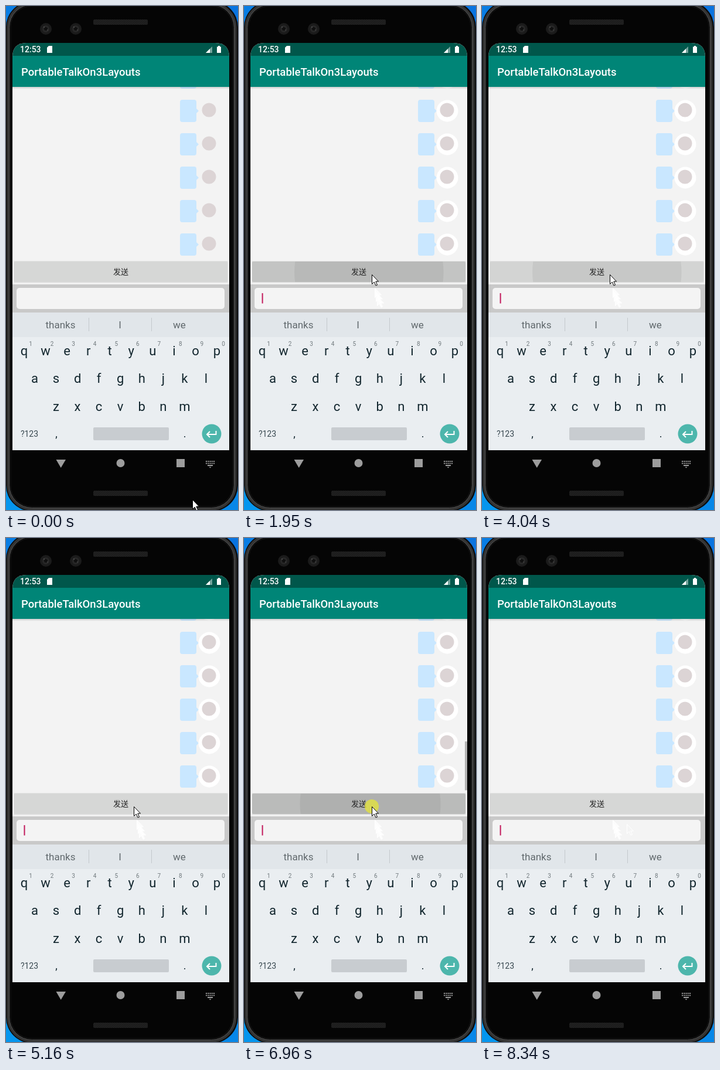
An HTML page that plays this animation: 396x860 px, repeating every 8650 ms.

```html
<!DOCTYPE html>
<html lang="en">
<head>
<meta charset="utf-8">
<title>Chat screen</title>
<style>
html, body { margin: 0; width: 100%; height: 100%; overflow: hidden; background: #087fe0; }
svg { display: block; width: 396px; height: 860px; font-family: Roboto, sans-serif; }
.mid { text-anchor: middle; }
.han { font: 13px "Noto Sans CJK SC", "Noto Sans CJK", sans-serif; }
</style>
</head>
<body>
<svg viewBox="0 0 396 860">
  <defs>
    <clipPath id="screen"><path d="M11 758V87Q11 63 35 63H357Q381 63 381 87V758Z"/></clipPath>
    <clipPath id="listClip"><rect x="11" y="138" width="370" height="295"/></clipPath>
    <clipPath id="btnClip"><rect x="14" y="436" width="364" height="35" rx="2"/></clipPath>
    <linearGradient id="sky" x1="0" y1="1" x2=".6" y2="0">
      <stop stop-color="#0596ee"/><stop offset="1" stop-color="#0a74e0"/>
    </linearGradient>
    <linearGradient id="shade" x2="0" y2="1">
      <stop stop-color="#000" stop-opacity=".16"/><stop offset="1" stop-color="#000" stop-opacity="0"/>
    </linearGradient>
    <pattern id="mesh" width="3" height="3" patternUnits="userSpaceOnUse">
      <rect width="3" height="3" fill="#252525"/><path d="M0 3L3 0" stroke="#111"/>
    </pattern>
    <path id="arrow" d="M.5 .5V16.5L4.2 13L7 19L9.5 18L6.8 12H11.5Z"/>
    <g id="camera">
      <circle r="10" fill="#1b1b1b"/><circle r="6" fill="#272727"/><circle r="3" fill="#101010"/>
      <circle cx="-3" cy="-3" r="1" fill="#555"/><circle cx="3" cy="2" r="1" fill="#444"/>
    </g>
    <g id="message">
      <rect x="297" y="160" width="28" height="38" rx="4" fill="#c9e7ff"/>
      <path d="M325 175L329 179L325 183Z" fill="#c9e7ff"/>
      <circle class="ring" cx="347" cy="179" r="18.5" fill="#fff"/>
      <circle cx="346.5" cy="177.5" r="12" fill="#dcd4d5"/>
    </g>
  </defs>

  <rect width="396" height="860" fill="url(#sky)"/>
  <rect x="0" y="-8" width="396" height="870" rx="44" fill="#0c0c0c"/>
  <rect x="3.500" y="-4.500" width="388" height="863" rx="41" fill="none" stroke="#343434" stroke-width="4"/>
  <rect x="5.500" y="-2.500" width="384" height="859" rx="39" fill="none" stroke="#555"/>
  <rect x="8" y="0" width="379" height="854" rx="36" fill="#050505" stroke="#141414"/>
  <rect x="149" y="23" width="93" height="9" rx="2" fill="url(#mesh)"/>
  <rect x="149" y="827" width="93" height="9" rx="2" fill="url(#mesh)"/>
  <use href="#camera" x="68" y="39"/>
  <use href="#camera" x="119" y="39"/>

  <g clip-path="url(#screen)">
    <rect x="11" y="63" width="370" height="695" fill="#f3f3f3"/>
    <rect x="11" y="63" width="370" height="22" fill="#00574b"/>
    <rect x="11" y="85" width="370" height="53" fill="#008577"/>
    <g fill="#fff">
      <text x="24" y="79" font-size="14" font-weight="500">12:53</text>
      <path d="M73 68H79V80H70V71Z"/>
      <path d="M341 80L352 69V80Z" opacity=".45"/><path d="M341 80L348 73V80Z"/>
      <path d="M360 69.500H362V68H365V69.500H367V80H360Z"/>
      <text x="26" y="119" font-size="18.500" font-weight="500">PortableTalkOn3Layouts</text>
    </g>
    <g clip-path="url(#listClip)">
      <g id="list"></g>
      <rect id="bar" x="377" width="4" fill="#000"/>
    </g>
    <rect x="11" y="138" width="370" height="4" fill="url(#shade)"/>

    <rect x="13" y="435" width="366" height="37.500" rx="2" fill="#e2e2e2"/>
    <g clip-path="url(#btnClip)">
      <rect x="14" y="436" width="364" height="35" fill="#d6d7d6"/>
      <rect id="press" x="14" y="436" width="364" height="35"/>
      <circle id="ripple" cy="454"/>
    </g>
    <text class="mid han" x="196" y="458" fill="#202020">发送</text>

    <rect x="11" y="475" width="370" height="48" fill="#c9c9c9"/>
    <rect x="18" y="481" width="355" height="36" rx="5" fill="#f4f4f4"/>
    <rect id="caret" x="30.500" y="490" width="2" height="17.500"/>

    <rect x="11" y="523" width="370" height="42" fill="#e1e6ea"/>
    <rect x="11" y="565" width="370" height="193" fill="#eaeef1"/>
    <path d="M141.500 532V555M248.500 532V555" stroke="#c4c9cc"/>
    <g id="keys" class="mid"></g>
    <rect x="149" y="719" width="129" height="22" rx="2" fill="#c8ccd0"/>
    <circle cx="351" cy="730" r="16.500" fill="#4db6ac"/>
    <path d="M358.500 725V731H343.500M348 726L343 731L348 736" fill="none" stroke="#fff" stroke-width="2"/>
  </g>

  <g fill="#9d9d9d">
    <path d="M85.500 774H102L93.700 788Z"/>
    <circle cx="195.500" cy="780" r="7"/>
    <rect x="291" y="773" width="14" height="14"/>
    <path d="M341 777H356M341 780.500H356" stroke="#9d9d9d" stroke-width="2" stroke-dasharray="2 1.250"/>
    <path d="M344 783H353V785H344ZM346.500 786.500H350.500L348.500 788.500Z"/>
  </g>

  <g id="trail" fill="#fff" fill-opacity=".7" stroke="#fff">
    <use href="#arrow" x="223" y="481"/><use href="#arrow" x="225" y="488"/><use href="#arrow" x="227" y="495"/>
  </g>
  <use id="echo" href="#arrow" x="247" y="488" fill="none" stroke="#fff"/>
  <circle id="click" cx="218" cy="458" r="12" fill="#e8e832" fill-opacity=".72"/>
  <use id="mouse" href="#arrow" fill="#fff" stroke="#000"/>
</svg>

<script>
const LOOP = 8650, PITCH = 57, VIEW = 293;
const $ = id => document.getElementById(id);
const set = (id, attrs) => { for (const k in attrs) $(id).setAttribute(k, attrs[k]); };
const clamp = v => Math.max(0, Math.min(1, v));
const easeOut = v => 1 - (1 - v) ** 2;
const smooth = v => v * v * (3 - 2 * v);

// One entry per tap: down, up, ripple start, list scroll, bar fade (ms), button shade
const taps = [
  [690, 920, 780, 1000, 1630, .08],
  [1480, 1780, 1870, 2080, 2800, .09],
  [2480, 2880, 2480, 3020, 3780, .07],
  [3810, 3960, 3960, 4100, 4840, .015],
  [5310, 5420, 5320, 5440, 6100, .08],
  [6170, 6330, 6110, 6400, 7200, .03],
  [6870, 7000, 6900, 7060, 7560, .13]
].map(([down, up, ripple, scroll, fade, shade]) => ({ down, up, ripple, scroll, fade, shade }));

const blinks = [380, 880, 1100, 3330, 3850, 4610, 5090, 5940, 6440, 7560, 8060];

const path = [
  [0, 318, 842], [50, 318, 842], [250, 262, 650], [460, 225, 480], [600, 225, 480], [690, 218, 458],
  [7480, 218, 458], [7560, 247, 488], [7650, 275, 598], [7800, 352, 770], [8000, 379, 862], [LOOP, 379, 862]
];

function mouseAt(t) {
  const i = path.findIndex(p => p[0] > t), [a, x, y] = path[i - 1], [b, u, v] = path[i];
  const k = (t - a) / (b - a);
  return { x: x + (u - x) * k, y: y + (v - y) * k };
}

function build() {
  let keys = '';
  const label = (s, x, y, size, color = '#12262e') =>
    keys += `<text x="${x}" y="${y}" font-size="${size}" fill="${color}">${s}</text>`;
  [['thanks', 93], ['I', 194.5], ['we', 296]].forEach(([s, x]) => label(s, x, 550, 17, '#60686c'));
  [['qwertyuiop', 31, 596], ['asdfghjkl', 49, 643], ['zxcvbnm', 85.5, 691]].forEach(([row, x, y], r) =>
    [...row].forEach((c, i) => {
      label(c, x + i * 36.55, y, 22);
      if (!r) label((i + 1) % 10, x + 11 + i * 36.55, 580, 10, '#717a7e');
    }));
  label('?123', 40, 735, 14, '#37474f');
  label(',', 86, 736, 18);
  label('.', 305, 736, 18);
  $('keys').innerHTML = keys;
  for (let i = -1; i < 6; i++) $('list').innerHTML += `<use href="#message" y="${i * PITCH}"/>`;
}

function draw(t) {
  const sent = taps.filter(p => t >= p.scroll).length;
  const last = taps[sent - 1];
  const moved = last ? easeOut(clamp((t - last.scroll) / 320)) : 1;
  set('list', { transform: `translate(0 ${moved < 1 ? -PITCH * moved : 0})` });
  document.querySelector('.ring').setAttribute('opacity', sent ? 1 : 0);

  const h = VIEW * VIEW / (688 + PITCH * sent);
  set('bar', { y: 430.5 - h, height: h, opacity: last ? .27 * (1 - clamp((t - last.fade) / 240)) : 0 });

  const tap = taps.filter(p => t >= p.ripple).pop();
  const glow = tap ? 1 - clamp((t - tap.scroll) / 300) : 0;
  const grow = tap ? smooth(clamp((t - tap.ripple) / 250)) : 0;
  set('press', { opacity: tap ? tap.shade * glow : 0 });
  set('ripple', { cx: 219 - 23 * grow, r: 109 + 74 * grow, opacity: .06 * glow });

  const on = blinks.filter(b => t >= b).length % 2;
  set('caret', { fill: on ? '#c2185b' : '#fff', opacity: on || t > 600 ? 1 : 0 });

  set('click', { opacity: taps.some(p => t >= p.down && t < p.up) ? 1 : 0 });
  set('mouse', mouseAt(t));
  set('trail', { opacity: t > 460 ? 1 : 0 });
  set('echo', { opacity: t > 7600 ? 1 : 0 });
}

function tick() {
  draw(performance.now() % LOOP);
  requestAnimationFrame(tick);
}

build();
tick();
</script>
</body>
</html>
```
